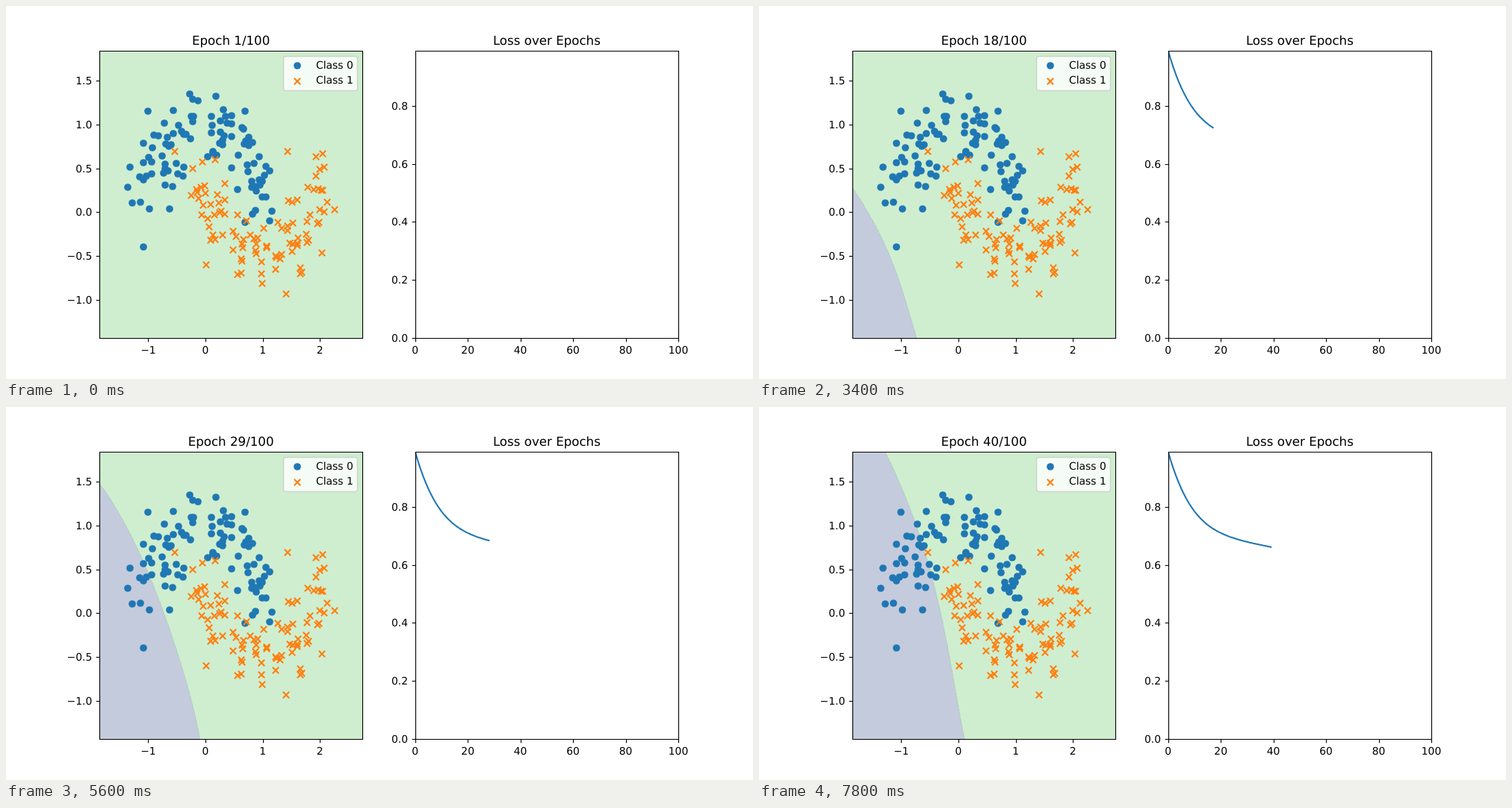
Write an HTML page that moves like this. It is 1000 by 500 pixels and loops after 8000 ms.

```html
<!DOCTYPE html>
<html lang="en">
<head>
<meta charset="utf-8">
<title>Training progress</title>
<style>
  html, body { margin: 0; width: 100%; height: 100%; overflow: hidden; background: #fff; }
  svg { display: block; width: 100vw; height: 100vh; }
  text { font: 13.89px "DejaVu Sans", sans-serif; text-rendering: geometricPrecision; }
  .title { font-size: 16.67px; text-anchor: middle; }
  .mid { text-anchor: middle; }
  .end { text-anchor: end; }
  .axis { fill: none; stroke: #000; stroke-width: 1.11; }
  .dot { fill: #1f77b4; }
  .cross { fill: none; stroke: #ff7f0e; stroke-width: 2.083; }
  .loss { fill: none; stroke: #1f77b4; stroke-width: 2.083; stroke-linecap: square; stroke-linejoin: round; }
</style>
</head>
<body>
<svg viewBox="0 0 1000 500">
  <defs>
    <clipPath id="leftClip"><rect x="125" y="60" width="352.27" height="385"/></clipPath>
    <clipPath id="rightClip"><rect x="547.73" y="60" width="352.27" height="385"/></clipPath>
  </defs>
  <g id="plot"></g>
</svg>
<script>
const STEP = 200, EPOCHS = 40;
const LEFT = 125, RIGHT = 547.73, TOP = 60, BOTTOM = 445, W = 352.27, H = 385;
const plot = document.getElementById('plot');

function add(tag, attrs, text) {
  const el = document.createElementNS('http://www.w3.org/2000/svg', tag);
  for (const key in attrs) el.setAttribute(key, attrs[key]);
  if (text) el.textContent = text;
  return plot.appendChild(el);
}

// Mersenne Twister, 32-bit output
function twister(seed) {
  const s = new Uint32Array(624);
  s[0] = seed;
  for (let i = 1; i < 624; i++) s[i] = Math.imul(1812433253, s[i - 1] ^ (s[i - 1] >>> 30)) + i;
  let pos = 624;
  return () => {
    if (pos === 624) {
      for (let i = 0; i < 624; i++) {
        const y = (s[i] & 0x80000000) | (s[(i + 1) % 624] & 0x7fffffff);
        s[i] = s[(i + 397) % 624] ^ (y >>> 1) ^ (y & 1 ? 0x9908b0df : 0);
      }
      pos = 0;
    }
    let y = s[pos++];
    y ^= y >>> 11;
    y ^= (y << 7) & 0x9d2c5680;
    y ^= (y << 15) & 0xefc60000;
    return (y ^ (y >>> 18)) >>> 0;
  };
}

// Two interleaving half circles, shuffled, with gaussian noise
function moons(count, noise, seed) {
  const next = twister(seed);
  const uniform = () => {
    const hi = next() >>> 5, lo = next() >>> 6;
    return (hi * 67108864 + lo) / 9007199254740992;
  };
  const order = Array.from({ length: count }, (_, i) => i);
  for (let i = count - 1; i > 0; i--) {
    const mask = 2 ** (32 - Math.clz32(i)) - 1;
    let j;
    do j = next() & mask; while (j > i);
    [order[i], order[j]] = [order[j], order[i]];
  }
  const half = count / 2;
  return order.map(i => {
    const a = Math.PI * (i % half) / (half - 1), label = i < half ? 0 : 1;
    let u, v, r;
    do {
      u = 2 * uniform() - 1;
      v = 2 * uniform() - 1;
      r = u * u + v * v;
    } while (r >= 1 || r === 0);
    const f = noise * Math.sqrt(-2 * Math.log(r) / r);
    return {
      label,
      x: (label ? 1 - Math.cos(a) : Math.cos(a)) + f * v,
      y: (label ? 0.5 - Math.sin(a) : Math.sin(a)) + f * u
    };
  });
}

const points = moons(200, 0.2, 0);

// Plot range: data padded by 0.5, cut to whole grid cells
const GRID = 0.01;
function range(values) {
  const min = Math.min(...values) - 0.5, max = Math.max(...values) + 0.5;
  const cells = Math.ceil((max - min) / GRID) - 1;
  return { min, cells, size: cells * GRID };
}
const rx = range(points.map(p => p.x)), ry = range(points.map(p => p.y));
const px = x => LEFT + (x - rx.min) / rx.size * W;
const py = y => BOTTOM - (y - ry.min) / ry.size * H;

function lagrange(xs, ys, x) {
  return ys.reduce((sum, y, i) =>
    sum + xs.reduce((t, xj, j) => j === i ? t : t * (x - xj) / (xs[i] - xj), y), 0);
}

// Decision boundary: x at five heights for some epochs
const heights = [60, 156.25, 252.5, 348.75, 445];
const keyEpochs = [10, 18, 23, 29, 33, 40];
const keyBounds = [
  [-115, -33, 35, 98.5, 142.5],
  [-25, 56, 131, 180.5, 211],
  [33, 112, 171, 211, 238.5],
  [91, 159, 202.5, 235.5, 259.5],
  [128, 179, 215.5, 245, 267.5],
  [169, 209.5, 237.7, 257.5, 275]
];

function regionPath(epoch) {
  if (epoch < 9) return '';
  const after = keyEpochs.findIndex(k => k >= epoch);
  const from = Math.max(0, Math.min(after - 2, keyEpochs.length - 4));
  const near = keyEpochs.slice(from, from + 4);
  const xs = heights.map((_, h) =>
    lagrange(near, keyBounds.slice(from, from + 4).map(b => b[h]), epoch));
  const cw = W / rx.cells, ch = H / ry.cells;
  const edge = row => LEFT + cw * (Math.floor((lagrange(heights, xs, TOP + row * ch) - LEFT) / cw) + 0.5);
  let prev = edge(0), d = `M-500 50L${prev} 50L${prev} ${TOP}`;
  for (let row = 1; row <= ry.cells; row++) {
    const x = edge(row), y = TOP + row * ch, turn = Math.sign(x - prev) * cw / 2;
    if (turn) d += `L${prev + turn} ${y - ch / 2}L${x - turn} ${y - ch / 2}`;
    d += `L${x} ${y}`;
    prev = x;
  }
  return d + `L${prev} 455L-500 455Z`;
}

const lossAt = i => 0.7274 - 0.0017 * i + 0.2624 * Math.exp(-0.1145 * i - 0.0012 * i * i);
function lossPath(epoch) {
  if (epoch < 2) return '';
  let d = '';
  for (let i = 0; i < epoch; i++)
    d += `${i ? 'L' : 'M'}${RIGHT + i * W / 100} ${BOTTOM - lossAt(i) / lossAt(0) * H}`;
  return d;
}

const snap = v => Math.round(v) + 0.5;
function frame(left) {
  const x = snap(left), right = snap(left + W);
  add('path', { class: 'axis', d: `M${x} 60.5H${right}V445.5H${x}Z` });
}
function xTick(x, label) {
  add('path', { class: 'axis', d: `M${snap(x)} 445.5v4.86` });
  add('text', { class: 'mid', x, y: 466 }, label);
}
function yTick(left, y, label) {
  add('path', { class: 'axis', d: `M${snap(left)} ${snap(y)}h-4.86` });
  add('text', { class: 'end', x: left - 9.72, y: Math.round(y + 5) }, label);
}
const signed = s => String(s).replace('-', '\u2212');

// Markers sit on whole pixels
const dot = (x, y) => add('circle', { class: 'dot', cx: Math.round(x), cy: Math.round(y), r: 4.86 });
const cross = (x, y) => add('path', {
  class: 'cross',
  d: `M${Math.round(x) - 4.167} ${Math.round(y) - 4.167}l8.333 8.333m0 -8.333l-8.333 8.333`
});

// Left chart
add('rect', { x: LEFT, y: TOP, width: W, height: H, fill: '#cfeecf' });
const clipLeft = 'url(#leftClip)';
const region = add('path', { fill: '#c4cbdc', 'clip-path': clipLeft, 'shape-rendering': 'crispEdges' });
const seam = add('path', { fill: 'none', stroke: '#a5cab7', 'stroke-width': 0.7, 'clip-path': clipLeft });
points.filter(p => !p.label).forEach(p => dot(px(p.x), py(p.y)));
points.filter(p => p.label).forEach(p => cross(px(p.x), py(p.y)));
frame(LEFT);
[-1, 0, 1, 2].forEach(v => xTick(px(v), signed(v)));
[-1, -0.5, 0, 0.5, 1, 1.5].forEach(v => yTick(LEFT, py(v), signed(v.toFixed(1))));
const title = add('text', { class: 'title', x: LEFT + W / 2, y: 52 });

// Legend
add('rect', {
  x: 371.5, y: 67.5, width: 99, height: 46, rx: 2.78,
  fill: '#fff', stroke: '#ccc', 'stroke-width': 1.39, opacity: 0.8
});
dot(390, 80);
cross(390, 101);
add('text', { x: 415, y: 84 }, 'Class 0');
add('text', { x: 415, y: 104 }, 'Class 1');

// Right chart
const loss = add('path', { class: 'loss', 'clip-path': 'url(#rightClip)' });
frame(RIGHT);
[0, 20, 40, 60, 80, 100].forEach(v => xTick(RIGHT + v * W / 100, String(v)));
[0, 0.2, 0.4, 0.6, 0.8].forEach(v => yTick(RIGHT, BOTTOM - v / lossAt(0) * H, v.toFixed(1)));
add('text', { class: 'title', x: RIGHT + W / 2, y: 52 }, 'Loss over Epochs');

let shown = 0;
function draw() {
  const epoch = Math.floor(performance.now() % (STEP * EPOCHS) / STEP) + 1;
  if (epoch !== shown) {
    shown = epoch;
    title.textContent = `Epoch ${epoch}/100`;
    const d = regionPath(epoch);
    region.setAttribute('d', d);
    seam.setAttribute('d', d);
    loss.setAttribute('d', lossPath(epoch));
  }
  requestAnimationFrame(draw);
}
draw();
</script>
</body>
</html>
```
